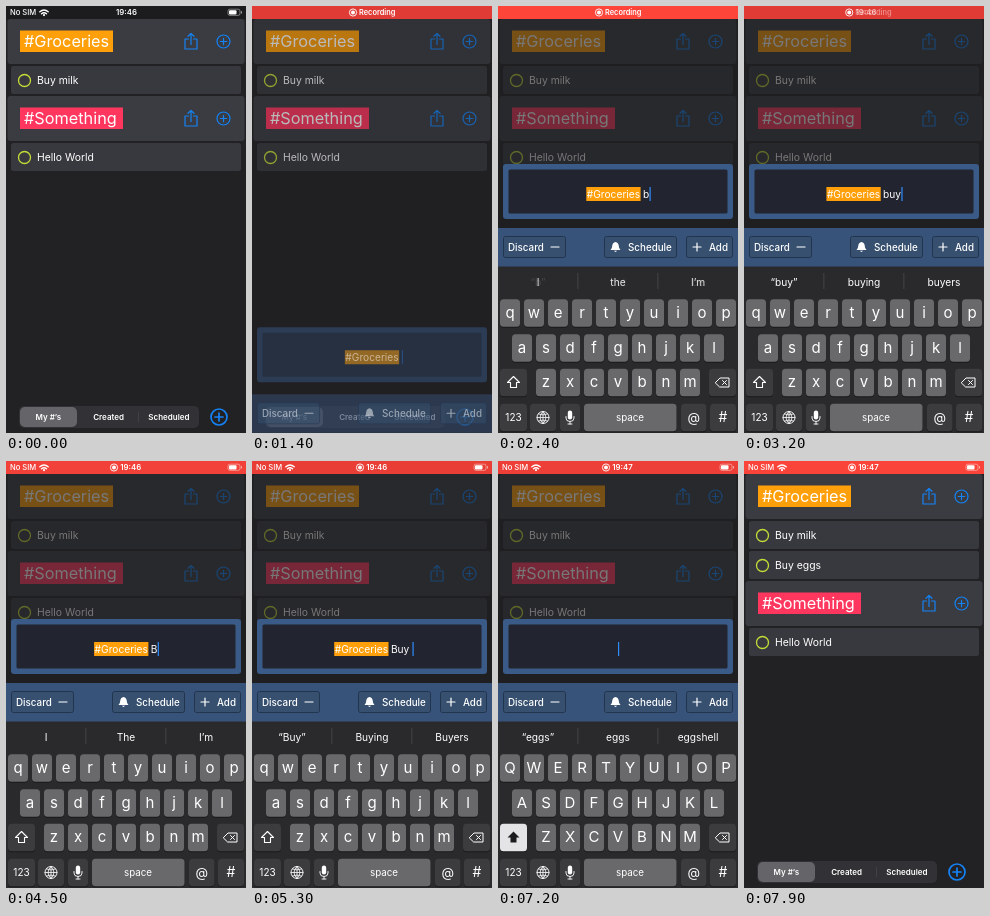
Recreate the animation shown at these times as an HTML page with a canvas. Size 240x427 px, loop 8000 ms.

```html
<!DOCTYPE html>
<html lang="en">
<head>
<meta charset="utf-8">
<title>Hashtag list</title>
<style>
html, body { margin: 0; width: 100%; height: 100%; overflow: hidden; background: #222124; }
canvas { display: block; width: 240px; height: 427px; }
</style>
</head>
<body>
<canvas id="stage"></canvas>
<script>
const canvas = document.getElementById('stage');
const c = canvas.getContext('2d');
const scale = window.devicePixelRatio || 1;
canvas.width = Math.round(240 * scale);
canvas.height = Math.round(427 * scale);

const LOOP = 8000, BLUE = '#1483f5', WHITE = '#fff';
const ROWS = ['qwertyuiop', 'asdfghjkl', 'zxcvbnm'];
const ROW_Y = [307, 342, 376.5, 411.5];

// Typing steps: time, key, text after the tag, suggestions
const START = ['I', 'the', 'I’m'];
const STEPS = [
  [0, '', '', START],
  [2350, 'b', 'b', ['“b”', 'but', 'be']],
  [2650, 'u', 'bu', ['“bu”', 'but', 'buy']],
  [2950, 'y', 'buy', ['“buy”', 'buying', 'buyers']],
  [3450, 'back', 'bu', ['“bu”', 'but', 'buy']],
  [3650, 'back', 'b', ['“b”', 'but', 'be']],
  [3850, 'back', '', START],
  [4150, 'shift', '', ['I', 'The', 'I’m']],
  [4480, 'b', 'B', ['“B”', 'But', 'Be']],
  [4750, 'u', 'Bu', ['“Bu”', 'But', 'Buy']],
  [5000, 'y', 'Buy', ['“Buy”', 'Buying', 'Buyers']],
  [5300, 'space', 'Buy ', ['a', 'the', 'some']],
  [5600, 'e', 'Buy e', ['“e”', 'every', 'each']],
  [5850, 'g', 'Buy eg', ['“eg”', 'eg', 'egg']],
  [6100, 'g', 'Buy egg', ['“egg”', 'egg', 'eggs']],
  [6600, 's', 'Buy eggs', ['“eggs”', 'eggs', 'eggshell']],
  [7180, 'add', null, ['I', 'The', 'I’m']]
];

const ramp = (t, a, b) => Math.min(1, Math.max(0, (t - a) / (b - a)));
const smooth = p => p * p * (3 - 2 * p);

function faded(alpha, draw) {
  c.save();
  c.globalAlpha *= alpha;
  draw();
  c.restore();
}

function box(x, y, w, h, fill, r = 0) {
  c.fillStyle = fill;
  c.beginPath();
  c.roundRect(x, y, w, h, r);
  c.fill();
}

function setFont(size, weight = 400) {
  c.font = `${weight} ${size}px Inter, "Liberation Sans", sans-serif`;
}

function text(str, x, cy, size, { color = WHITE, weight = 400, align = 'left' } = {}) {
  setFont(size, weight);
  c.fillStyle = color;
  c.textAlign = align;
  c.fillText(str, x, cy + size * 0.36);
}

// Strokes (or fills) an SVG path around a point
function icon(path, x, y, color, width = 1, fill = false) {
  c.save();
  c.translate(x, y);
  c.lineWidth = width;
  c.lineCap = c.lineJoin = 'round';
  c.strokeStyle = c.fillStyle = color;
  const shape = new Path2D(path);
  if (fill) c.fill(shape);
  else c.stroke(shape);
  c.restore();
}

function ring(x, y, r, color, width) {
  c.strokeStyle = color;
  c.lineWidth = width;
  c.beginPath();
  c.arc(x, y, r, 0, 7);
  c.stroke();
}

function dot(x, y, r, color) {
  c.fillStyle = color;
  c.beginPath();
  c.arc(x, y, r, 0, 7);
  c.fill();
}

function plusButton(x, y, r, width) {
  ring(x, y, r, BLUE, width);
  const a = r * 0.5;
  icon(`M${-a} 0H${a}M0 ${-a}V${a}`, x, y, BLUE, width);
}

function header(label, y, width, color) {
  box(1.5, y, 237, 45, '#3a3c42', 3);
  box(14, y + 11.5, width, 21.5, color);
  text(label, 18, y + 22.5, 16.3);
  icon('M-2.5 -2.5H-6V7.5H6V-2.5H2.5M0 3V-8M-3 -5.2L0 -8L3 -5.2', 185, y + 22.5, BLUE, 1.2);
  plusButton(217.5, y + 22.5, 6.5, 1.2);
}

function item(label, y) {
  box(5, y, 230, 28, '#38393e', 2.5);
  ring(18.5, y + 14.5, 6, '#c3dc38', 1.3);
  text(label, 31, y + 14.5, 10.4);
}

function list(t) {
  const open = smooth(ramp(t, 7480, 7780));
  header('#Groceries', 13, 93, '#ff9f0a');
  item('Buy milk', 60);
  if (open) faded(open, () => item('Buy eggs', 60 + 30 * open));
  header('#Something', 90 + 30 * open, 103, '#ff375f');
  item('Hello World', 137 + 30 * open);
}

function tabs() {
  box(13, 400, 180, 22, '#323236', 5);
  box(14, 401, 57, 20, '#646469', 5);
  box(132, 406, 0.7, 10, '#48484c');
  ['My #’s', 'Created', 'Scheduled'].forEach((name, i) =>
    text(name, 42.3 + 60.3 * i, 411, 8, { weight: 600, align: 'center' }));
  plusButton(213, 411, 8, 1.7);
}

function recordIcon(x) {
  ring(x, 6.5, 3.6, WHITE, 0.9);
  dot(x, 6.5, 2, WHITE);
}

function sideStatus() {
  text('No SIM', 4, 6.5, 7.6, { weight: 500 });
  icon('M-4.2 -1.2Q0 -5 4.2 -1.2M-2.5 .8Q0 -1.4 2.5 .8', 38, 7, WHITE, 1.4);
  dot(38, 9.1, 1.1, WHITE);
  c.strokeStyle = 'rgba(255,255,255,.6)';
  c.lineWidth = 0.7;
  c.beginPath();
  c.roundRect(222, 3.2, 12, 6.2, 1.8);
  c.stroke();
  box(223, 4.2, 7.5, 4.2, WHITE, 1);
  box(235, 5, 1, 2.6, 'rgba(255,255,255,.6)', 0.5);
}

function status(t) {
  const bold = { weight: 600 };
  const red = ramp(t, 300, 600);
  const clock = ramp(t, 3080, 3280);
  const pulse = 0.5 - 0.5 * Math.cos((t - 1400) / 1800 * 2 * Math.PI);
  box(0, 0, 240, 13, '#1c1c1e');
  if (red < 1) faded(1 - red, () => {
    text('19:46', 120.5, 6.5, 7.8, { weight: 600, align: 'center' });
    sideStatus();
  });
  faded(red, () => {
    box(0, 0, 240, 13, `rgb(${224 + 31 * pulse},${59 + 10 * pulse},${53 + 5 * pulse})`);
    const x = 101 + 7 * clock;
    recordIcon(x);
    if (clock < 1) faded(1 - clock, () => text('Recording', x + 6, 6.5, 7.4, bold));
    faded(clock, () => text(t < 5450 ? '19:46' : '19:47', x + 6.2, 6.5, 7.8, bold));
    faded(ramp(t, 3250, 3450), sideStatus);
  });
}

function inputBox(t, y, entry) {
  box(5, y, 230, 55, '#3a5a87', 3);
  box(10.5, y + 5.5, 219, 44, '#22242f', 1.5);
  const tag = '#Groceries', size = 10.2, cy = y + 30;
  setFont(size);
  const tagWidth = c.measureText(tag).width;
  const gap = c.measureText(' ').width;
  let caret = 120;
  if (entry !== null) {
    const shown = c.measureText(entry.trimEnd()).width;
    const total = tagWidth + (shown ? gap + shown : 0);
    const x = 120 - total / 2;
    box(x - 0.5, cy - 7, tagWidth + 1, 14, '#ff9f0a');
    text(tag, x, cy, size);
    text(entry, x + tagWidth + gap, cy, size);
    caret = x + tagWidth + gap + c.measureText(entry).width + 0.3;
  }
  const last = STEPS.filter(s => s[0] <= t).pop()[0];
  const idle = (t - Math.max(last, 1900)) % 1000;
  faded(idle < 0 ? 0.6 : 1 - ramp(idle, 500, 600) + ramp(idle, 900, 1000), () =>
    box(caret, cy - 7, 1.2, 14, '#2f8cff'));
}

function button(label, x, w, labelX, pressed) {
  c.strokeStyle = '#22354f';
  c.lineWidth = 1;
  c.beginPath();
  c.roundRect(x + 0.5, 230.5, w - 1, 21, 2);
  c.fillStyle = pressed ? '#294263' : '#37506f';
  c.fill();
  c.stroke();
  text(label, labelX, 241, 9.8, { weight: 500 });
}

function toolbar(t) {
  box(0, 222, 240, 39, '#38537a');
  button('Discard', 5, 63, 10);
  icon('M-4 0H4', 57, 241, WHITE, 1.2);
  button('Schedule', 106, 73, 130);
  icon('M-5 3Q-3.3 1.5 -3.3 -1Q-3 -4.5 0 -5Q3 -4.5 3.3 -1Q3.3 1.5 5 3ZM-1.6 3.8H1.6Q0 6 -1.6 3.8Z',
    117.5, 241, WHITE, 1, true);
  button('Add', 188, 47, 211, t > 7070 && t < 7180);
  icon('M-4 0H4M0 -4V4', 199, 241, WHITE, 1.2);
}

function key(x, row, w, color) {
  const y = ROW_Y[row] - 13.8;
  box(x, y + 1, w, 27.6, '#19191a', 3.5);
  box(x, y, w, 27.6, color, 3.5);
}

function suggestions(words, alpha) {
  faded(alpha, () => words.forEach((word, i) =>
    text(word, 40 + 80 * i, 276.5, 10.2, { align: 'center' })));
}

function keyboard(t, index) {
  const LIGHT = '#69696b', DARK = '#3c3c3f';
  const next = STEPS[index + 1];
  const pressed = next && t > next[0] - 110 ? next[1] : '';
  const caps = (t >= 4150 && t < 4480) || t >= 7180;
  box(0, 260.5, 240, 180, '#2a2a2c');

  const change = index ? ramp(t, STEPS[index][0] + 30, STEPS[index][0] + 190) : 1;
  if (change < 1) suggestions(STEPS[index - 1][3], 1 - change);
  suggestions(STEPS[index][3], change);
  box(79.5, 267, 0.8, 16, '#4a4a4c');
  box(159.5, 267, 0.8, 16, '#4a4a4c');

  let popup = null;
  ROWS.forEach((letters, row) => [...letters].forEach((letter, i) => {
    const x = [12, 24, 48][row] + 24 * i;
    const glyph = caps ? letter.toUpperCase() : letter;
    key(x - 10, row, 20, LIGHT);
    if (letter === pressed) popup = [x, ROW_Y[row], glyph];
    else text(glyph, x, ROW_Y[row] - 0.6, 15, { align: 'center' });
  }));

  const shiftOn = caps || pressed === 'shift';
  key(2, 2, 27, shiftOn ? '#e4e4e6' : DARK);
  icon('M0 -6L6 0H3V5H-3V0H-6Z', 15.5, 376.5, shiftOn ? '#1c1c1e' : WHITE, 1.1, caps);
  key(211, 2, 27, pressed === 'back' ? LIGHT : DARK);
  icon('M-7 0L-2.5 -4.5H6.5V4.5H-2.5ZM0 -2L4 2M4 -2L0 2', 224.5, 376.5, WHITE, 1);

  key(2, 3, 27, DARK);
  text('123', 15.5, 411, 10, { align: 'center' });
  key(32, 3, 26, DARK);
  ring(45, 411.5, 6, WHITE, 0.9);
  icon('M-6 0H6M0 -6V6M0 -6Q-6 0 0 6Q6 0 0 -6M-4.6 -3.5Q0 -1.5 4.6 -3.5M-4.6 3.5Q0 1.5 4.6 3.5',
    45, 411.5, WHITE, 0.8);
  key(62, 3, 20, DARK);
  box(69.8, 404.5, 4.4, 9, WHITE, 2.2);
  icon('M-4 -1V.5Q-4 4 0 4Q4 4 4 .5V-1M0 4V6.5M-2 6.5H2', 72, 411.5, WHITE, 0.9);
  key(86, 3, 92.5, pressed === 'space' ? DARK : LIGHT);
  text('space', 132, 411, 9.8, { align: 'center' });
  key(183, 3, 25.5, DARK);
  text('@', 195.8, 411, 13, { align: 'center' });
  key(212, 3, 26, DARK);
  text('#', 225, 411, 14, { align: 'center' });

  if (popup) {
    const [x, y, glyph] = popup;
    icon('M-10 14V-12Q-17 -18 -17 -22V-46Q-17 -51 -12 -51H12Q17 -51 17 -46V-22Q17 -18 10 -12V14Z',
      x, y, LIGHT, 1, true);
    text(glyph, x, y - 34, 23, { align: 'center' });
  }
}

function composer(t) {
  const index = STEPS.findLastIndex(s => s[0] <= t);
  const leave = ramp(t, 7280, 7620) ** 2;
  const rest = (1 - ramp(t, 1400, 2085)) ** 3;
  const show = ramp(t, 1200, 1600) * (1 - ramp(t, 7300, 7620));
  if (!show) return;
  faded(show, () => {
    box(0, 13, 240, 414, 'rgba(29,29,31,.6)');
    inputBox(t, 158 + 164 * Math.max(rest ** 1.15, leave), STEPS[index][2]);
    c.translate(0, 167 * Math.max(rest, leave));
    toolbar(t);
    keyboard(t, index);
  });
}

function draw(now) {
  const t = now % LOOP;
  c.setTransform(scale, 0, 0, scale, 0, 0);
  box(0, 0, 240, 427, '#222124');
  list(t);
  tabs();
  composer(t);
  status(t);
  requestAnimationFrame(draw);
}

let origin;
requestAnimationFrame(function begin(now) {
  origin = 0;
  draw(now - origin);
});
</script>
</body>
</html>
```
